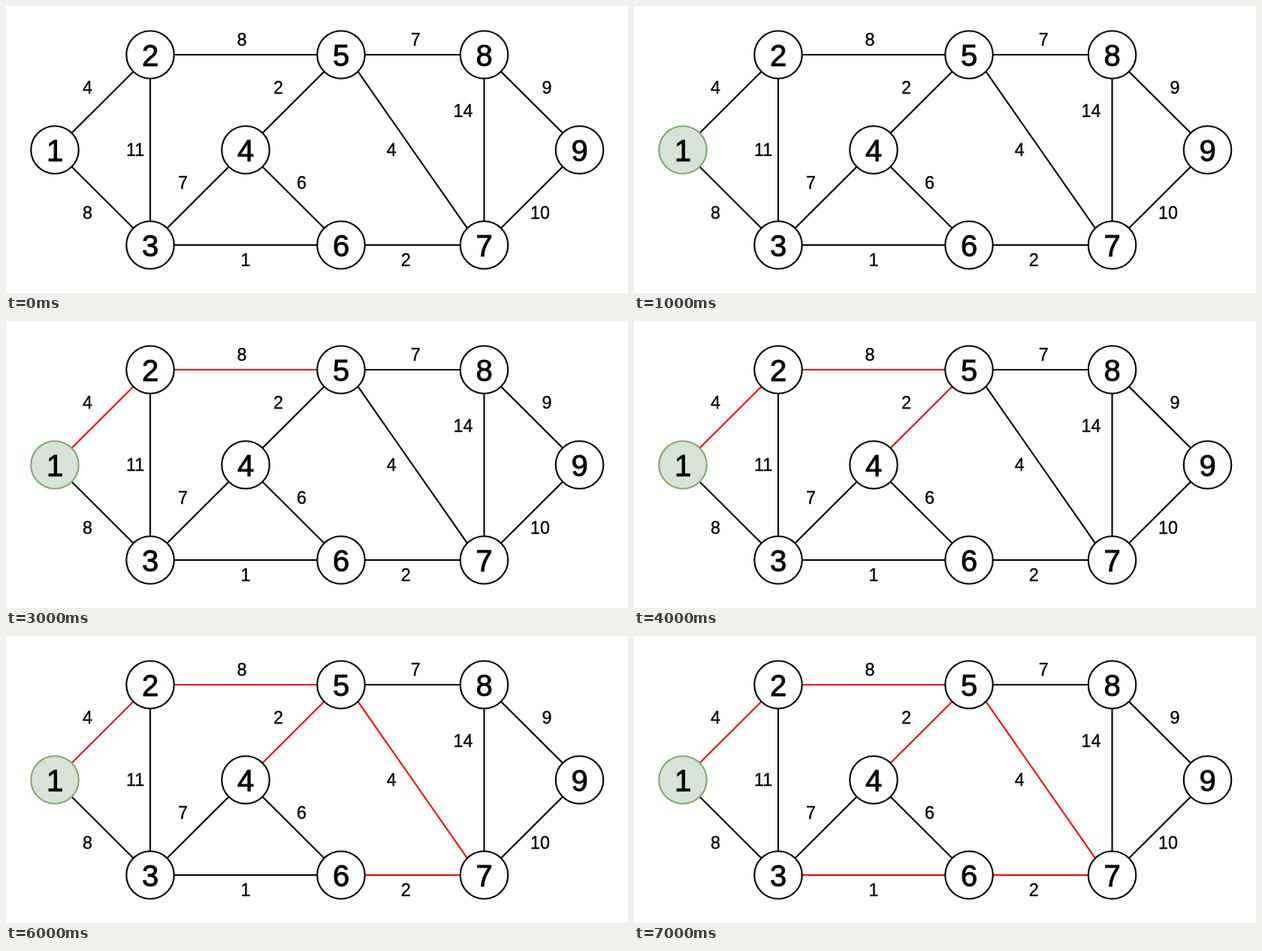
An HTML page for the animation above (8000 ms loop, 828 px wide and 383 px high).

```html
<!DOCTYPE html>
<html lang="en">
<head>
<meta charset="utf-8">
<title>Minimum spanning tree</title>
<style>
  html, body { margin: 0; width: 100%; height: 100%; overflow: hidden; background: #fff; }
  svg { display: block; width: 828px; height: 383px; }
  line, circle { stroke: #000; stroke-width: 2.12; }
  circle { fill: #fff; }
  text { font-family: "Liberation Sans", Arial, sans-serif; text-anchor: middle; stroke: #000; }
  .node { font-size: 40px; stroke-width: .9; }
  .weight { font-size: 23.3px; stroke-width: .35; }
</style>
</head>
<body>
<svg id="stage" viewBox="0 0 828 383"></svg>
<script>
const LOOP = 8000, STEP = 1000;
const ORIGIN = 65, CELL = 63.5, RADIUS = CELL / 2, LABEL_GAP = 20;
const stage = document.getElementById('stage');

// Column and row of nodes 1 to 9
const nodes = [[0, 2], [2, 0], [2, 4], [4, 2], [6, 0], [6, 4], [9, 4], [9, 0], [11, 2]]
  .map(cell => cell.map(n => ORIGIN + n * CELL));

// from, to, weight, nudge of the label; the label lies left of the direction of travel
const edges = [
  [1, 2, 4], [2, 5, 8, -5], [3, 1, 8], [3, 2, 11], [4, 5, 2],
  [3, 4, 7], [4, 6, 6, -9], [6, 3, 1], [7, 6, 2, -9], [7, 5, 4, -8, -LABEL_GAP],
  [5, 8, 7, 4], [7, 8, 14, -8, -52], [8, 9, 9], [9, 7, 10, -9]
];

// Prim's algorithm: edges of the tree in the order they are picked
function growTree(start) {
  const reached = new Set([start]), picked = [];
  while (reached.size < nodes.length) {
    const border = edges.filter(([a, b]) => reached.has(a) !== reached.has(b));
    const best = border.reduce((min, edge) => edge[2] < min[2] ? edge : min);
    reached.add(best[0]).add(best[1]);
    picked.push(best);
  }
  return picked;
}

function add(tag, attrs, label = '') {
  const el = document.createElementNS('http://www.w3.org/2000/svg', tag);
  for (const key in attrs) el.setAttribute(key, attrs[key]);
  el.textContent = label;
  return stage.appendChild(el);
}

// Switches to a new look at the given step and resets with the loop.
function switchAt(step, el, before, after) {
  const offset = step * STEP / LOOP;
  if (offset >= 1) return;
  el.animate([
    { ...before, offset: 0, easing: 'step-end' },
    { ...after, offset },
    { ...after, offset: 1 }
  ], { duration: LOOP, iterations: Infinity }).startTime = 0;
}

const tree = growTree(1);
for (const edge of edges) {
  const [from, to, weight, nudgeX = 0, nudgeY = 0] = edge;
  const [ax, ay] = nodes[from - 1], [bx, by] = nodes[to - 1];
  const dx = Math.sign(bx - ax), dy = Math.sign(by - ay);
  const trim = RADIUS / Math.hypot(dx, dy);
  const line = add('line', {
    x1: ax + dx * trim, y1: ay + dy * trim, x2: bx - dx * trim, y2: by - dy * trim
  });
  const order = tree.indexOf(edge);
  if (order >= 0) switchAt(order + 2, line, { stroke: '#000' }, { stroke: '#f00' });
  add('text', {
    class: 'weight',
    x: (ax + bx) / 2 + dy * LABEL_GAP + nudgeX,
    y: (ay + by) / 2 - dx * LABEL_GAP + nudgeY + 8
  }, weight);
}

nodes.forEach(([cx, cy], i) => {
  const disc = add('circle', { cx, cy, r: RADIUS });
  if (i === 0) {
    switchAt(1, disc, { fill: '#fff', stroke: '#000' }, { fill: '#d6e4d5', stroke: '#82a96a' });
  }
  add('text', { class: 'node', x: cx, y: cy + 14.6 }, i + 1);
});
</script>
</body>
</html>
```
